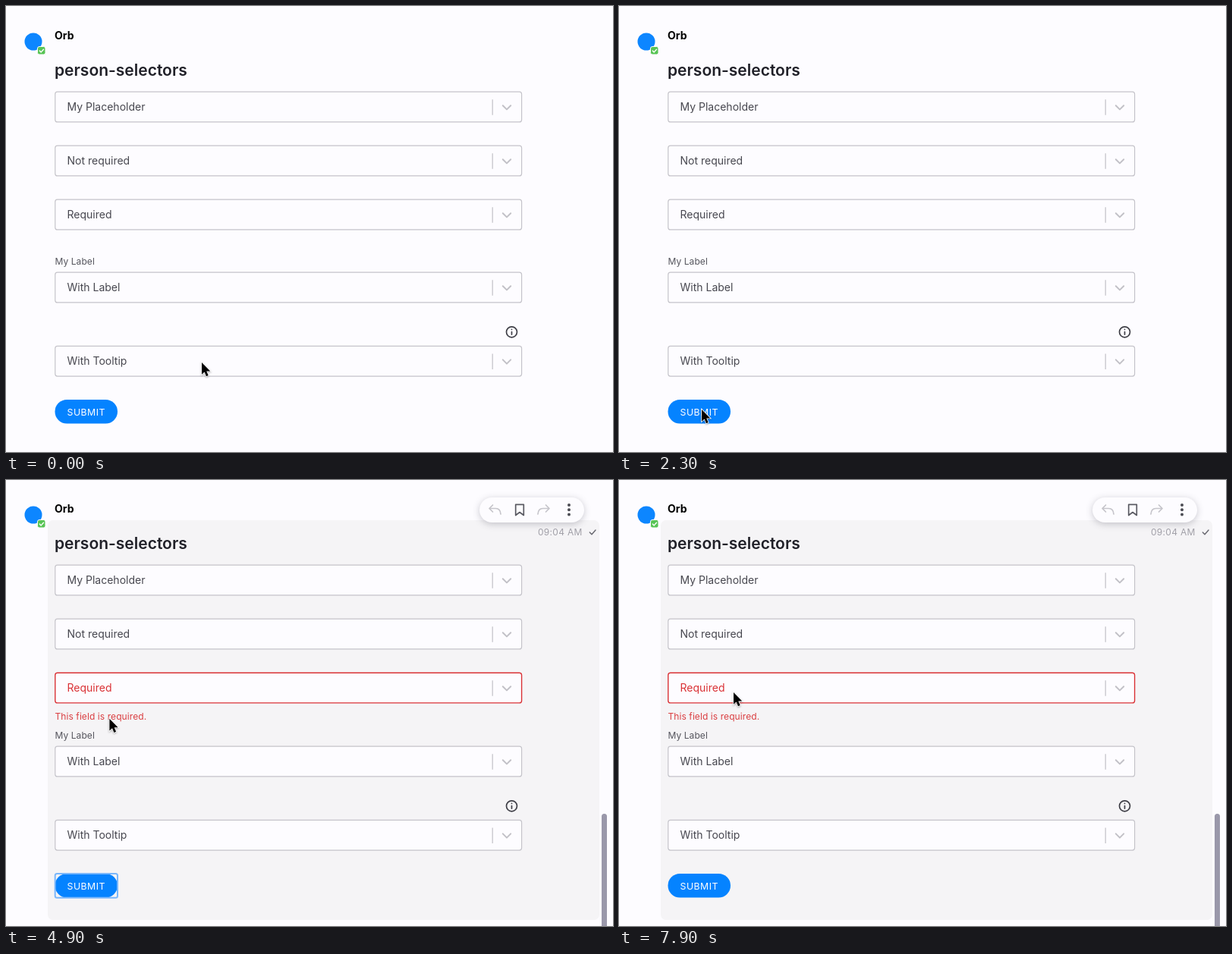
These frames come from a looping animation (800 by 588 pixels, 8 s). An HTML page:

```html
<!DOCTYPE html>
<html lang="en">
<head>
<meta charset="utf-8">
<title>Form validation</title>
<style>
  html, body { margin: 0; width: 100%; height: 100%; overflow: hidden; background: #fdfcff; }
  svg { display: block; font-family: Inter, "Noto Sans", sans-serif; }
  .field rect { fill: #fdfcff; stroke: #c5c4ca; stroke-width: 1.2; }
  .field text { font-size: 14px; fill: #47474f; }
  .field path { fill: none; stroke: #c2c1c7; }
  .field.bad rect { stroke: #da3236; stroke-width: 1.4; }
  .field.bad text { fill: #da3236; }
  .small { font-size: 12px; letter-spacing: .08px; }
  .line { fill: none; stroke-linecap: round; stroke-linejoin: round; }
  .shadow { filter: drop-shadow(0 2px 5px rgba(30, 30, 50, .24)); }
  .pointer { filter: drop-shadow(0 1px 1px rgba(0, 0, 0, .3)); }
</style>
</head>
<body>
<svg width="800" height="588" viewBox="0 0 800 588">
  <rect id="panel" x="55" y="54" width="727" height="526" rx="7" fill="#f5f4f6"/>
  <path id="scrollbar" d="M785 590V443.5a3.5 3.5 0 0 1 7 0V590z" fill="#9a98aa"/>

  <g id="upper">
    <circle cx="36" cy="47" r="11.5" fill="#0d86ff"/>
    <rect x="41.5" y="53.5" width="10.5" height="10.5" rx="2.5" fill="#58c455" stroke="#fdfcff"/>
    <path class="line" d="M44.3 59l1.9 1.9 3.3-3.7" stroke="#fff" stroke-width="1.4"/>
    <text x="64" y="43.5" font-size="14" font-weight="700">Orb</text>
    <text x="64" y="92" font-size="21" font-weight="600" fill="#202028">person-selectors</text>
    <g id="tools">
      <rect class="shadow" x="624" y="24" width="138" height="33" rx="16.5" fill="#fdfcff"/>
      <g class="line" stroke-width="1.7">
        <path d="M641.5 34l-4.5 4.5 4.5 4.5M637 38.5h8.500q6 0 6.500 7.500M711.500 34l4.500 4.500-4.500 4.500M716 38.500h-8.500q-6 0-6.500 7.500" stroke="#c6c5cb"/>
        <path d="M671.700 33.300h10.600v14.200l-5.300-4-5.300 4z" stroke="#5b5b63"/>
        <path d="M769.300 70l2.700 2.700 5-5.700" stroke="#67676f" stroke-width="1.400"/>
      </g>
      <g fill="#4c4c54">
        <circle cx="742" cy="34" r="2"/><circle cx="742" cy="40.300" r="2"/><circle cx="742" cy="46.600" r="2"/>
      </g>
      <text x="701" y="74.300" font-size="12" letter-spacing=".3" fill="#a09fa7">09:04 AM</text>
    </g>
  </g>

  <text id="error" class="small" x="64.500" y="315.800" fill="#da3f42">This field is required.</text>
  <text class="small" x="64.500" y="340.800" fill="#55555d">My Label</text>
  <g id="lower"></g>

  <g class="line" stroke="#404048" stroke-width="1.700">
    <circle cx="666.500" cy="429.800" r="7"/>
    <path d="M666.500 429.500v3.600M666.500 426.400v.1"/>
  </g>

  <rect id="button" x="64.500" y="519" width="82.500" height="31.500" rx="15.750"/>
  <text id="caption" x="80.500" y="539.500" font-size="12.300" letter-spacing=".5">SUBMIT</text>
  <rect id="focus" x="64.700" y="519" width="82.300" height="31.800" rx="2.500" fill="none" stroke="#7ab7fb" stroke-width="2"/>
  <circle id="ring" cx="105" cy="536" r="34.500" fill="none" stroke="#17171b" stroke-width="1.700"/>

  <g id="arrow" class="pointer">
    <path d="M0 0V15.800L3.600 12.500 6 18.200 8.700 17 6.300 11.500H11.300Z" stroke="#fff" stroke-width="1.600" paint-order="stroke"/>
  </g>
  <g id="hand" class="pointer">
    <path d="M-2 11V1.600a1.700 1.700 0 0 1 3.400 0V7a1.600 1.600 0 0 1 3.200.3a1.600 1.600 0 0 1 3 .5a1.500 1.500 0 0 1 2.800.7V13L9 16V19H-.5V17L-5 11.500a1.600 1.600 0 0 1 2.400-1.800Z"
          fill="#fff" stroke="#000" stroke-width="1.200" stroke-linejoin="round"/>
    <path d="M1.700 12v4M4.200 12v4M6.700 12v4" stroke="#000"/>
  </g>
</svg>
<script>
const LOOP = 8000, STEP = 100;
const HOVER = 2800, PRESS = 3000, RELEASE = 3400, INVALID = 3500, LEAVE = 3800, BLUR = 5000;
const $ = id => document.getElementById(id);

// time, x, y of the pointer tip
const path = [
  [0, 258, 470], [100, 345, 410], [200, 312, 296], [300, 312, 296],
  [500, 240, 196], [800, 145, 116], [1000, 66, 56], [1200, 74, 62],
  [1400, 112, 130], [1700, 126, 300], [2000, 112, 490], [2100, 108, 527],
  [2300, 109, 532], [2600, 105, 536], [3700, 105, 536], [4100, 106, 347],
  [4500, 82, 318], [5000, 150, 314], [5400, 203, 314], [5800, 188, 313],
  [6300, 165, 299], [6600, 165, 299], [7100, 156, 286], [7500, 151, 280],
  [LOOP, 151, 280]
];

function addField(parent, label, y) {
  const g = document.createElementNS("http://www.w3.org/2000/svg", "g");
  g.setAttribute("class", "field");
  g.innerHTML = `<rect x="64.8" y="${y}" width="614.8" height="39.7" rx="3"/>
    <text x="80.500" y="${y + 24.500}">${label}</text>
    <path d="M641.200 ${y + 10}v20.500" stroke-width="1.200"/>
    <path class="line" d="M654.800 ${y + 18}l5.200 5.200 5.200-5.200" stroke-width="2"/>`;
  parent.append(g);
  return g;
}

addField($("upper"), "My Placeholder", 113.2);
addField($("upper"), "Not required", 184.2);
const required = addField($("upper"), "Required", 255.2);
addField($("lower"), "With Label", 351.2);
addField($("lower"), "With Tooltip", 448.4);

function pointerAt(t) {
  const i = path.findIndex(p => p[0] > t);
  const [t0, x0, y0] = path[i - 1], [t1, x1, y1] = path[i];
  const k = (t - t0) / (t1 - t0);
  return [x0 + (x1 - x0) * k, y0 + (y1 - y0) * k];
}

function show(id, on) {
  $(id).style.display = on ? "" : "none";
}

function draw(t) {
  const hover = t >= HOVER, invalid = t >= INVALID;
  const onButton = hover && t < LEAVE;
  const lift = invalid ? 1 : 0;

  for (const id of ["panel", "scrollbar", "tools"]) show(id, hover);
  $("panel").setAttribute("y", 54 - lift);
  $("panel").setAttribute("height", 526 + lift);
  $("upper").setAttribute("transform", `translate(0 ${-lift})`);
  required.classList.toggle("bad", invalid);
  show("error", invalid);

  $("button").setAttribute("fill", onButton ? "#0868cc" : "#0583ff");
  $("caption").setAttribute("fill", onButton ? "#dbe8f8" : "#fff");
  show("focus", t >= PRESS && t < BLUR);
  show("ring", t >= PRESS && t < RELEASE);

  const [x, y] = pointerAt(t);
  for (const id of ["arrow", "hand"]) $(id).setAttribute("transform", `translate(${x} ${y})`);
  show("hand", onButton);
  show("arrow", !onButton);
}

const start = performance.now();
function tick() {
  const t = (performance.now() - start) % LOOP;
  draw(Math.floor(t / STEP) * STEP);
  requestAnimationFrame(tick);
}
tick();
</script>
</body>
</html>
```
